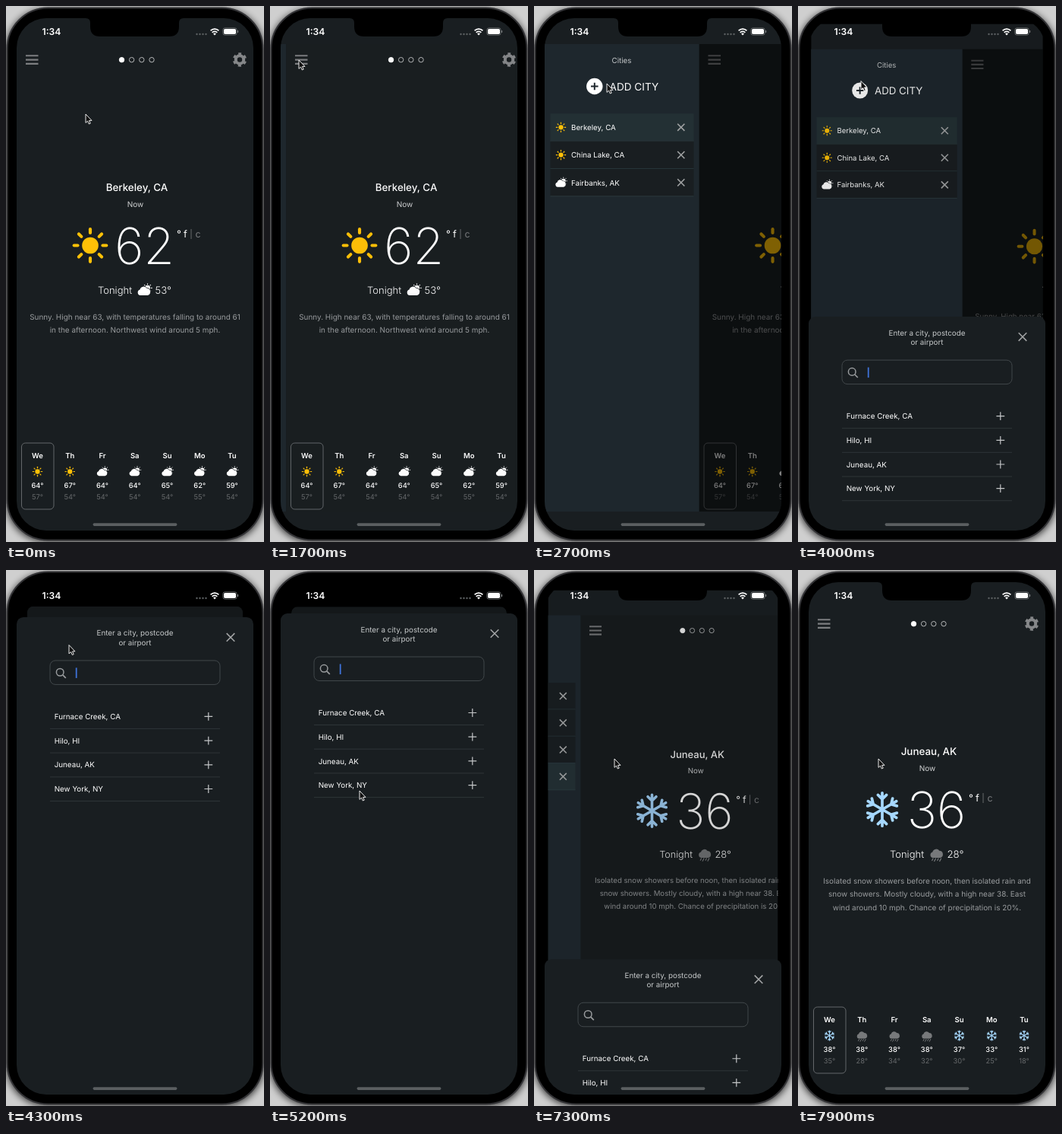
An HTML page for the animation above (8000 ms loop, 340x704 px).

```html
<!DOCTYPE html>
<html lang="en">
<head>
<meta charset="utf-8">
<title>Weather app</title>
<style>
html, body { margin: 0; width: 100%; height: 100%; overflow: hidden; background: #000; }
svg { display: block; width: 340px; height: 704px; font-family: Inter, Roboto, sans-serif; text-rendering: geometricPrecision; }
</style>
</head>
<body>
<svg id="stage" viewBox="0 0 340 704"></svg>
<script>
const BG = '#191e21', DRAWER = '#1e272d', ACTIVE = '#233034', GRAY = '#858789';
const $ = id => document.getElementById(id);
const rect = (x, y, w, h, fill, more = '') =>
  `<rect x="${x}" y="${y}" width="${w}" height="${h}" fill="${fill}" ${more}/>`;
const line = (d, color, width = 1, more = '') =>
  `<path d="${d}" fill="none" stroke="${color}" stroke-width="${width}" ${more}/>`;
const text = (x, y, size, str, fill = '#fff', weight = 400, anchor = 'middle') =>
  `<text x="${x}" y="${y}" font-size="${size}" fill="${fill}" font-weight="${weight}" text-anchor="${anchor}">${str}</text>`;
const icon = (name, x, y, scale) =>
  `<use href="#${name}" transform="translate(${x} ${y}) scale(${scale})"/>`;
const cross = (x, y, r) => line(`M${x - r} ${y - r}l${2 * r} ${2 * r}m0 ${-2 * r}l${-2 * r} ${2 * r}`, '#a0a2a3', 1.6);
const plus = (x, y, r, color, width) => line(`M${x - r} ${y}h${2 * r}M${x} ${y - r}v${2 * r}`, color, width);
const spokes = (count, d, color, width) => Array.from({ length: count }, (_, i) =>
  line(d, color, width, `stroke-linecap="round" transform="rotate(${i * 360 / count})"`)).join('');
const bars = (x, y) => line(`M${x} ${y}h16.5m-16.5 5.3h16.5m-16.5 5.3h16.5`, '#7c7e80', 2.1);

const cloud = 'M-5.5 7A3.9 3.9 0 0 1 -6 -.6A5 5 0 0 1 3 -2.2A4.7 4.7 0 0 1 4.3 7Z';
const defs = `<defs>
  <clipPath id="screen">${rect(14, 16, 312, 673, '#000', 'rx="39"')}</clipPath>
  <clipPath id="cardClip">${rect(14, 16, 312, 673, '#000', 'rx="9"')}</clipPath>
  <filter id="soft"><feGaussianBlur stdDeviation="5"/></filter>
  <g id="sun"><circle r="10.5" fill="#ffc107"/>${spokes(8, 'M0-16v-4.7', '#ffc107', 4)}</g>
  <g id="snow">${spokes(6, 'M0 0V-21M-5.5-18.5L0-13.2L5.5-18.5', '#a6d8ff', 3.6)}</g>
  <g id="cloud">
    <circle cx="4" cy="-2.6" r="3.6" fill="#fff"/>
    <g transform="translate(4 -2.6)">${spokes(8, 'M0-5v-.7', '#fff', 1.1)}</g>
    <path d="${cloud}" fill="#fff" stroke="${BG}" stroke-width="1.4" paint-order="stroke"/>
  </g>
  <g id="rain">
    <path d="${cloud}" fill="#77797b" transform="translate(.8 -2)"/>
    ${line('M-4.5 6l-1.3 2.5M-1 6l-1.8 3.4M2.5 6l-1.3 2.5M6 6l-1.8 3.4', '#77797b', 1.2, 'stroke-linecap="round"')}
  </g>
</defs>`;

const small = { sun: .3, snow: .31, cloud: .82, rain: .82 };
const berkeley = {
  id: 'berkeley', name: 'Berkeley, CA', icon: 'sun', now: 62, night: 'cloud', low: 53,
  lines: ['Sunny. High near 63, with temperatures falling to around 61',
    'in the afternoon. Northwest wind around 5 mph.'],
  icons: ['sun', 'sun', 'cloud', 'cloud', 'cloud', 'cloud', 'cloud'],
  highs: [64, 67, 64, 64, 65, 62, 59], lows: [57, 54, 54, 54, 54, 55, 54]
};
const juneau = {
  id: 'juneau', name: 'Juneau, AK', icon: 'snow', now: 36, night: 'rain', low: 28,
  lines: ['Isolated snow showers before noon, then isolated rain and',
    'snow showers. Mostly cloudy, with a high near 38. East',
    'wind around 10 mph. Chance of precipitation is 20%.'],
  icons: ['snow', 'rain', 'rain', 'rain', 'snow', 'snow', 'snow'],
  highs: [38, 38, 38, 38, 37, 33, 31], lows: [35, 28, 34, 32, 30, 25, 18]
};

const forecast = c => `<g id="${c.id}">
  ${text(172.5, 243, 13.4, c.name, '#fff', 500)}
  ${icon(c.icon, 111, 314.5, 1.03)}
  ${text(182.5, 339, 66, c.now, '#fff', 200)}
  ${text(121, 378, 13, 'Tonight', '#fff', 300, 'start')}
  ${icon(c.night, 182.5, 373, 1)}
  ${text(196.5, 378, 13.2, c.low + '°', '#fff', 300, 'start')}
  ${c.lines.map((s, i) => text(170, 411.7 + i * 17.5, 9.95, s, '#999c9e')).join('')}
  ${['We', 'Th', 'Fr', 'Sa', 'Su', 'Mo', 'Tu'].map((day, i) => {
    const x = 41.5 + i * 42.75;
    return text(x, 593.7, 9.5, day, '#fff', 600) + icon(c.icons[i], x, 611.5, small[c.icons[i]])
      + text(x, 632.8, 9.3, c.highs[i] + '°', '#fff', 500) + text(x, 648.2, 9.3, c.lows[i] + '°', '#66696b');
  }).join('')}
</g>`;

const gear = `<g transform="translate(308 70.5)" fill="none" stroke="${GRAY}">
  <circle r="5.2" stroke-width="4"/>
  <circle r="7.7" stroke-width="3" stroke-dasharray="4.03" stroke-dashoffset="2" transform="rotate(-90)"/></g>`;
const dots = [152.5, 165.6, 178.8, 192].map((x, i) =>
  `<circle cx="${x}" cy="70.7" r="3.2" fill="${i ? 'none' : '#fff'}" stroke="${i ? '#b4b6b7' : '#fff'}"/>`).join('');
const page = `<g id="page">
  ${bars(26, 65.3)}${dots}${gear}
  ${text(170.5, 263.5, 10, 'Now', '#d0d2d3')}
  ${text(225, 303.5, 13, '°', '#fff', 400, 'start')}${text(234, 303.5, 13, 'f', '#fff', 400, 'start')}
  ${line('M244 293v13', '#66696b')}${text(249.5, 303.5, 12.5, 'c', '#77797b', 400, 'start')}
  ${rect(20.5, 574, 42.5, 87, 'none', 'rx="5" stroke="#63676a"')}
  ${forecast(berkeley)}${forecast(juneau)}
  ${rect(14, 50, 312, 614, '#000', 'id="shade"')}
</g>`;

const menuRow = ([name, pic, id], i) => {
  const y = 141.3 + i * 36.3;
  return `<g id="row-${id}">${rect(22, y, 189, 36.3, BG)}
    ${line(`M22 ${y + 36}h189`, '#2b3a3f')}${icon(pic, 36, y + 18, small[pic])}
    ${text(49.5, y + 21.6, 9.75, name, '#fff', 400, 'start')}${cross(194.3, y + 18, 4.6)}</g>`;
};
const menu = `<g id="menu">
  ${rect(14, 50, 204, 614, DRAWER)}
  ${text(116, 74.6, 9.8, 'Cities', '#c3c6c8')}
  <circle cx="80.3" cy="105.5" r="10.7" fill="#fff"/>${plus(80.3, 105.5, 4.8, DRAWER, 2)}
  ${text(100, 110.6, 13.6, 'ADD CITY', '#fff', 400, 'start')}
  ${[['Berkeley, CA', 'sun', 'a'], ['China Lake, CA', 'sun', 'b'],
    ['Fairbanks, AK', 'cloud', 'c'], ['Juneau, AK', 'snow', 'd']].map(menuRow).join('')}
</g>`;

const choice = (name, i) => {
  const y = 187.5 + i * 31.7;
  return `<g id="choice${i}">${text(63.7, y + 3.6, 9.8, name, '#fff', 400, 'start')}${plus(266.8, y, 5.4, '#c4c6c7', 1.2)}</g>
    ${line(`M58 ${y + 16}h224`, '#2e3437')}`;
};
const modal = `<g id="modal">
  ${rect(14, 57, 312, 720, BG, 'rx="9"')}
  ${text(170, 81.5, 9.85, 'Enter a city, postcode', '#c6c9ca')}
  ${text(170, 94, 9.85, 'or airport', '#c6c9ca')}
  ${cross(296, 83.5, 5.3)}
  ${rect(58, 114, 224, 31.5, 'none', 'rx="7" stroke="#41474a"')}
  <circle cx="71.2" cy="129.3" r="4.8" fill="none" stroke="#989b9d" stroke-width="1.5"/>
  ${line('M74.8 132.9l4 4', '#989b9d', 1.7)}
  ${rect(91.8, 123.5, 1.8, 13.5, '#3f73d8', 'id="caret"')}
  ${['Furnace Creek, CA', 'Hilo, HI', 'Juneau, AK', 'New York, NY'].map(choice).join('')}
</g>`;

const status = `
  <path d="M105 15H234V16Q228 16 228 22V27Q228 40 215 40H124Q111 40 111 27V22Q111 16 105 16Z"/>
  ${text(60, 38.2, 12.2, '1:34', '#fff', 600)}
  ${[251.5, 255.5, 259.5, 263.5].map(x => `<circle cx="${x}" cy="37" r="1.2" fill="#5d6163"/>`).join('')}
  ${line('M269.6 32.4a7.6 7.6 0 0 1 10.8 0M271.7 34.8a4.6 4.6 0 0 1 6.6 0', '#fff', 1.7)}
  <path d="M275 38.6l-1.9-2a2.6 2.6 0 0 1 3.8 0Z" fill="#fff"/>
  ${rect(285.8, 28.8, 18.4, 9.4, 'none', 'rx="2.8" stroke="#777a7c" stroke-width=".8"')}
  ${rect(287, 30, 16, 7, '#fff', 'rx="1.8"')}${rect(305, 32, 1.2, 3, '#777a7c', 'rx=".6"')}`;

$('stage').innerHTML = defs + rect(0, 0, 340, 704, '#cfcfcf')
  + rect(0, 4, 340, 700, '#000', 'rx="54" opacity=".75" filter="url(#soft)"')
  + rect(1.5, 2.5, 337, 699, '#000', 'rx="54" stroke="#343437" stroke-width="2"')
  + `<g clip-path="url(#screen)">
    <g id="card" clip-path="url(#cardClip)">${rect(14, 16, 312, 673, BG)}${page}${menu}</g>
    ${rect(14, 16, 312, 673, '#000', 'id="dim"')}${modal}
    ${rect(114.5, 679.3, 111, 3.6, '#5b5f61', 'rx="1.8"')}
  </g>${status}
  <path id="cursor" d="M0 0V11.4L2.6 9.1L4.3 13L6.2 12.2L4.6 8.4H8Z" fill="#111" stroke="#fff" stroke-width=".9"/>`;

const clamp = x => Math.max(0, Math.min(1, x));

// cubic-bezier(.32, .72, 0, 1), solved by bisection
function ease(x) {
  x = clamp(x);
  if (x === 0 || x === 1) return x;
  let lo = 0, hi = 1, s;
  for (let i = 0; i < 24; i++) {
    s = (lo + hi) / 2;
    if (.96 * (1 - s) ** 2 * s + s ** 3 < x) lo = s; else hi = s;
  }
  return 2.16 * (1 - s) ** 2 * s + 3 * (1 - s) * s * s + s ** 3;
}

const path = [[0, 105, 142], [900, 105, 142], [1600, 38, 71], [1800, 38, 71], [2700, 96, 102],
  [3000, 95, 102], [3500, 88, 84], [3900, 83, 98.5], [4700, 83, 98.5], [5200, 118, 290],
  [5400, 118, 290], [6300, 106, 248], [8000, 106, 248]];

function pointer(t) {
  const i = path.findIndex(k => k[0] > t);
  const [t0, x0, y0] = path[i - 1], [t1, x1, y1] = path[i];
  const p = (1 - Math.cos(Math.PI * (t - t0) / (t1 - t0))) / 2;
  return [x0 + (x1 - x0) * p, y0 + (y1 - y0) * p];
}

const set = (id, name, value) => $(id).setAttribute(name, value);
const show = (id, on) => set(id, 'visibility', on ? 'visible' : 'hidden');

function draw(t) {
  const open = ease((t - 1694) / 400) - ease((t - 7199) / 400);
  const up = ease((t - 3922.5) / 500) - ease((t - 7197) / 500);
  const back = t < 7000 ? up * up : up;
  const shift = 203.5 * open, added = t >= 6900;

  set('page', 'transform', `translate(${shift})`);
  set('menu', 'transform', `translate(${shift - 204})`);
  set('shade', 'opacity', open * .5);
  set('card', 'transform', `translate(170 ${352 + 2 * back}) scale(${1 - .09 * back}) translate(-170 -352)`);
  set('dim', 'opacity', up * .2);
  set('modal', 'transform', `translate(0 ${673 * (1 - up)})`);
  show('modal', up > 0);

  show('berkeley', !added);
  show('juneau', added);
  show('row-d', added);
  $('row-a').firstChild.setAttribute('fill', added ? BG : ACTIVE);
  $('row-d').firstChild.setAttribute('fill', ACTIVE);

  set('caret', 'opacity', t < 6600 && (t + 1000) % 1000 < 600 ? 1 : 0);
  set('choice2', 'opacity', t >= 6400 && t < 6600 ? .5 : 1);
  set('cursor', 'transform', `translate(${pointer(t)})`);
}

const start = performance.now();
function tick() {
  draw(Math.floor((performance.now() - start) % 8000 / 100) * 100);
  requestAnimationFrame(tick);
}
tick();
</script>
</body>
</html>
```
